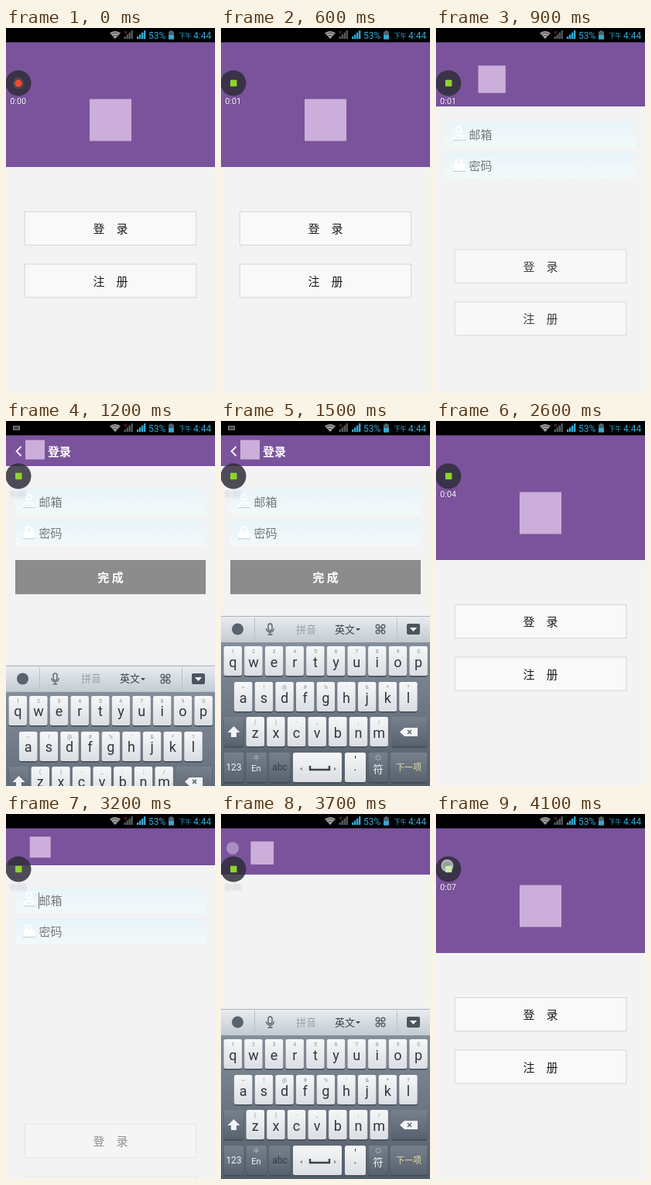
Recreate the animation shown at these times as an HTML page. Size 270 by 470 pixels, loop 4.2 s.

```html
<!DOCTYPE html>
<html lang="zh-CN">
<head>
<meta charset="utf-8">
<title>登录</title>
<style>
html, body { margin: 0; width: 100%; height: 100%; overflow: hidden; background: #f3f3f3; }
svg { display: block; width: 270px; height: 470px; }
text { font-family: Roboto, "Noto Sans CJK SC", "Noto Sans CJK", sans-serif; white-space: pre; }
</style>
</head>
<body>
<svg id="stage" viewBox="0 0 270 470">
  <defs>
    <linearGradient id="field" x2="0" y2="1"><stop stop-color="#e8f4fa"/><stop offset="1" stop-color="#f3f9f9"/></linearGradient>
    <linearGradient id="bar" x2="0" y2="1"><stop stop-color="#e9edf0"/><stop offset="1" stop-color="#c3cbd2"/></linearGradient>
    <linearGradient id="board" x2="0" y2="1"><stop stop-color="#8d98a4"/><stop offset="1" stop-color="#535d69"/></linearGradient>
    <linearGradient id="light" x2="0" y2="1"><stop stop-color="#f6f7f8"/><stop offset="1" stop-color="#dadee2"/></linearGradient>
    <linearGradient id="dark" x2="0" y2="1"><stop stop-color="#77818d"/><stop offset="1" stop-color="#58626e"/></linearGradient>
    <radialGradient id="bubble"><stop stop-color="#8c908c"/><stop offset=".7" stop-color="#a3a6a5"/><stop offset="1" stop-color="#c0c1c4"/></radialGradient>
  </defs>
</svg>
<script>
const LOOP = 4200, STEP = 100, MOVE = 285;
const visits = [{ open: 785, close: 2276 }, { open: 2990, close: 3676 }];
const stage = document.getElementById('stage');

function add(parent, tag, attrs, text) {
  const el = document.createElementNS(stage.namespaceURI, tag);
  set(el, attrs);
  if (text) el.textContent = text;
  parent.append(el);
  return el;
}
function set(el, attrs) {
  for (const k in attrs) el.setAttribute(k, attrs[k]);
}
const group = (parent = stage) => add(parent, 'g', {});
const rect = (parent, x, y, width, height, fill, more) =>
  add(parent, 'rect', { x, y, width, height, fill, ...more });
const circle = (parent, cx, cy, r, fill) => add(parent, 'circle', { cx, cy, r, fill });
const path = (parent, d, more) => add(parent, 'path', { d, ...more });
const line = (parent, d, stroke, width) =>
  path(parent, d, { fill: 'none', stroke, 'stroke-width': width });
const label = (parent, x, y, size, fill, text, more) =>
  add(parent, 'text', { x, y, 'font-size': size, fill, ...more }, text);
const mid = { 'text-anchor': 'middle' };
const clamp = v => Math.max(0, Math.min(1, v));
const mix = (a, b, p) => a + (b - a) * p;

// Page body
rect(stage, 0, 0, 270, 470, '#f3f3f3');
const buttons = group();
['登　录', '注　册'].forEach((name, i) => {
  const y = 236.5 + i * 67.5;
  rect(buttons, 24.3, y, 221.4, 43, '#f8f9f8', { stroke: '#d2d9d0' });
  label(buttons, 135, y + 27.5, 15, '#1b1b1b', name, mid);
});

const fields = group();
['邮箱', '密码'].forEach((name, i) => {
  const y = i * 40;
  rect(fields, 12, y, 246, 34, 'url(#field)', { rx: 1 });
  if (i) {
    line(fields, `M26 ${y + 16}v-3a3.5 3.5 0 0 1 7 0v3`, '#fff', 2);
    rect(fields, 23, y + 15, 14, 9, '#fff');
  } else {
    line(fields, 'M26 11a3.5 3.5 0 1 1 7 0a3.5 3.5 0 1 1 -7 0M23 23c1 -7 12 -7 13 0z', '#fff', 2);
  }
  line(fields, `M22 ${y + 24.5}h16`, '#c9d0d2', 1.2);
  label(fields, 42.5, y + 22.5, 15, '#787878', name);
});
const caret = rect(fields, 42, 7, 1, 21, '#777');

const done = group();
rect(done, 12, 179, 246, 44, '#8c8c8c');
label(done, 135, 206.5, 15, '#fff', '完 成', { ...mid, 'font-weight': 700 });

// Header
const header = rect(stage, 0, 18, 270, 161, '#7a539c');
const edge = rect(stage, 0, 0, 270, 1, '#75519a');
const mark = rect(stage, 0, 0, 1, 1, '#cbaed9');
const title = group();
line(title, 'M19.5 33l-6 6l6 6', '#fff', 1.8);
label(title, 54, 44.5, 15, '#fff', '登录', { 'font-weight': 700 });
const touch = circle(stage, 15, 44, 8, '#a98fc0');

// Keyboard
const board = group();
rect(board, 0, 251, 270, 219, 'url(#board)');
rect(board, 0, 251, 270, 34, 'url(#bar)');
line(board, 'M0 251.5h270', '#aab2b9', 1);
line(board, 'M43.5 253v31M227.5 253v31', '#b9c1c8', 1);
circle(board, 21.5, 268, 7.5, '#59636e');
rect(board, 61, 261, 5, 9, 'none', { rx: 2.5, stroke: '#59636e', 'stroke-width': 1.4 });
line(board, 'M58.5 267a5 5 0 0 0 10 0M63.5 272v3M60.5 275h6', '#59636e', 1.3);
label(board, 110, 272.5, 13, '#98a0a8', '拼音', mid);
label(board, 160, 272.5, 13, '#38414a', '英文', mid);
path(board, 'M174 267h6l-3 3z', { fill: '#38414a' });
for (const x of [202.5, 209.5]) for (const y of [264.5, 271.5])
  add(board, 'circle', { cx: x, cy: y, r: 2.3, fill: 'none', stroke: '#59636e', 'stroke-width': 1.4 });
rect(board, 204, 266, 4, 4, 'none', { stroke: '#59636e', 'stroke-width': 1.2 });
rect(board, 240, 261, 17, 14, '#4b555f', { rx: 2 });
path(board, 'M244 266h9l-4.5 5z', { fill: '#fff' });

function key(x, y, w, look = 'light') {
  rect(board, x, y + 1.5, w, 38, '#414b56', { rx: 2.5 });
  rect(board, x, y, w, 38, `url(#${look})`, { rx: 2.5 });
}
function keyRow(x, y, letters, hints) {
  [...letters].forEach((c, i) => {
    const left = x + i * 26.65;
    key(left, y, 23.5);
    label(board, left + 11.75, y + 9, 7, '#8a929a', hints[i], mid);
    label(board, left + 11.75, y + 26.5, 18, '#30363c', c, mid);
  });
}
keyRow(3.5, 290, 'qwertyuiop', '1234567890');
keyRow(17, 336, 'asdfghjkl', '~!@#%\'&*?');
keyRow(32.5, 381, 'zxcvbnm', '()-_:;/');
key(3.5, 381, 26, 'dark');
path(board, 'M16.5 393l-8 8h4.5v6h7v-6h4.5z', { fill: '#f1f3f5' });
key(220, 381, 46.5, 'dark');
path(board, 'M231 400.5l6 -5.5h17v11h-17z', { fill: '#f1f3f5' });
line(board, 'M241 398l5 5m0 -5l-5 5', '#5d6772', 1.5);
key(3.5, 427, 26, 'dark');
label(board, 16.5, 450, 12, '#f4f6f7', '123', mid);
key(32.5, 427, 26.5, 'dark');
label(board, 45.5, 436, 7, '#c2c9cf', '中', mid);
label(board, 45.5, 451, 11, '#f4f6f7', 'En', mid);
key(62, 427, 27.5, 'dark');
label(board, 76, 450, 12, '#333b44', 'abc', mid);
key(93, 427, 63);
line(board, 'M115 444v5h25v-5', '#3b434b', 2.4);
path(board, 'M105 445.5v5l-3 -2.5zM146 445.5v5l3 -2.5z', { fill: '#8a929a' });
key(160, 427, 27);
label(board, 173.5, 442, 15, '#30363c', '\'', mid);
label(board, 173.5, 450, 15, '#30363c', '.', mid);
key(190.5, 427, 25, 'dark');
add(board, 'circle', { cx: 203, cy: 433.5, r: 3, fill: 'none', stroke: '#c2c9cf', 'stroke-width': .7 });
label(board, 203, 453, 13, '#f4f6f7', '符', mid);
key(219, 427, 47.5, 'dark');
label(board, 242.5, 450, 11, '#e9dfab', '下一项', mid);

// Status bar
const cyan = '#32a9d6';
function signal(x, fill) {
  for (let i = 0; i < 4; i++) rect(stage, x + i * 3, 11 - i * 2.6, 2.4, 3 + i * 2.6, fill);
}
rect(stage, 0, 0, 270, 18.4, '#000');
const notice = group();
rect(notice, 9, 6, 9, 6, '#777');
line(notice, 'M10.5 8h6M10.5 10h6', '#111', 1);
path(stage, 'M134 6.5q7 -5 14 0l-7 7.5z', { fill: '#a2a2a2' });
line(stage, 'M135.5 8.2q5.5 -4 11 0M137.5 10.6q3.5 -2.6 7 0', '#333', .8);
signal(152.5, '#555a5c');
line(stage, 'M153 4l3 3m0 -3l-3 3', '#8a3f3a', 1);
signal(169, cyan);
label(stage, 184, 13.5, 12, cyan, '53%');
rect(stage, 212, 3.5, 3, 1.5, '#6b8792');
rect(stage, 210, 4.5, 7, 10, '#4b626c');
rect(stage, 210, 9, 7, 5.5, cyan);
label(stage, 223.5, 13, 8, cyan, '下午');
label(stage, 242, 13.5, 12, cyan, '4:44');

// Recorder
circle(stage, 16, 71, 16.5, '#2e2d38').setAttribute('opacity', .84);
const ready = group();
circle(ready, 16, 71, 7.5, '#4b4650');
circle(ready, 16, 71.3, 4.7, '#f4492f');
const stop = rect(stage, 12, 66.7, 8.5, 8.5, '#8fd32b', { rx: 1 });
const ending = group();
circle(ending, 14.5, 66.5, 8, 'url(#bubble)');
rect(ending, 12, 66.7, 8.5, 8.5, '#c9eda8', { rx: 1 });
const clock = label(stage, 15.7, 97.5, 10.8, '#fff', '0:00', mid);
clock.style.textShadow = '0 0 2px rgba(0,0,0,.4)';

const show = (el, on) => el.setAttribute('opacity', Number(on));

function draw(t) {
  const visit = visits.findLast(v => t >= v.open) || { open: Infinity, close: Infinity };
  const since = t - visit.open, back = t - visit.close;
  const closing = back >= 0;
  const rest = 1 - clamp((closing ? back : since) / MOVE);
  const p = closing ? rest * rest : 1 - rest * rest;
  const drop = closing ? rest : 1 - rest;
  const opened = !closing && rest === 0;

  const bottom = Math.round(mix(179, 58, p));
  set(header, { height: bottom - 18 });
  set(edge, { y: bottom - 1 });
  const side = mix(54, 25, p);
  set(mark, {
    x: mix(135, 37.5, p) - side / 2, y: mix(118.5, 37, p) - side / 2,
    width: side, height: side
  });

  set(buttons, { transform: `translate(0 ${300 * drop * drop})`, opacity: 1 - drop * drop });
  set(fields, {
    transform: `translate(0 ${Math.round(mix(181, 87, p))})`,
    opacity: closing ? 0 : clamp(p * 1.6)
  });
  const blink = since % 400;
  show(caret, since > 0 && blink > 150 && blink < 300);
  show(done, opened);
  show(title, opened);
  show(touch, back > -80 && back < 50);

  const up = closing ? 1 - clamp((back - 60) / 140) : clamp((since - 330) / 120);
  set(board, { transform: `translate(0 ${219 * (1 - up)})` });
  show(notice, up > 0 && !closing);

  show(ready, t < 200);
  show(stop, t >= 200 && t < 4100);
  show(ending, t >= 4100);
  clock.textContent = '0:0' + Math.floor(t * 1.75 / 1000);
}

const start = performance.now();
function tick() {
  const t = (performance.now() - start) % LOOP;
  draw(Math.floor(t / STEP) * STEP);
  requestAnimationFrame(tick);
}
tick();
</script>
</body>
</html>
```
